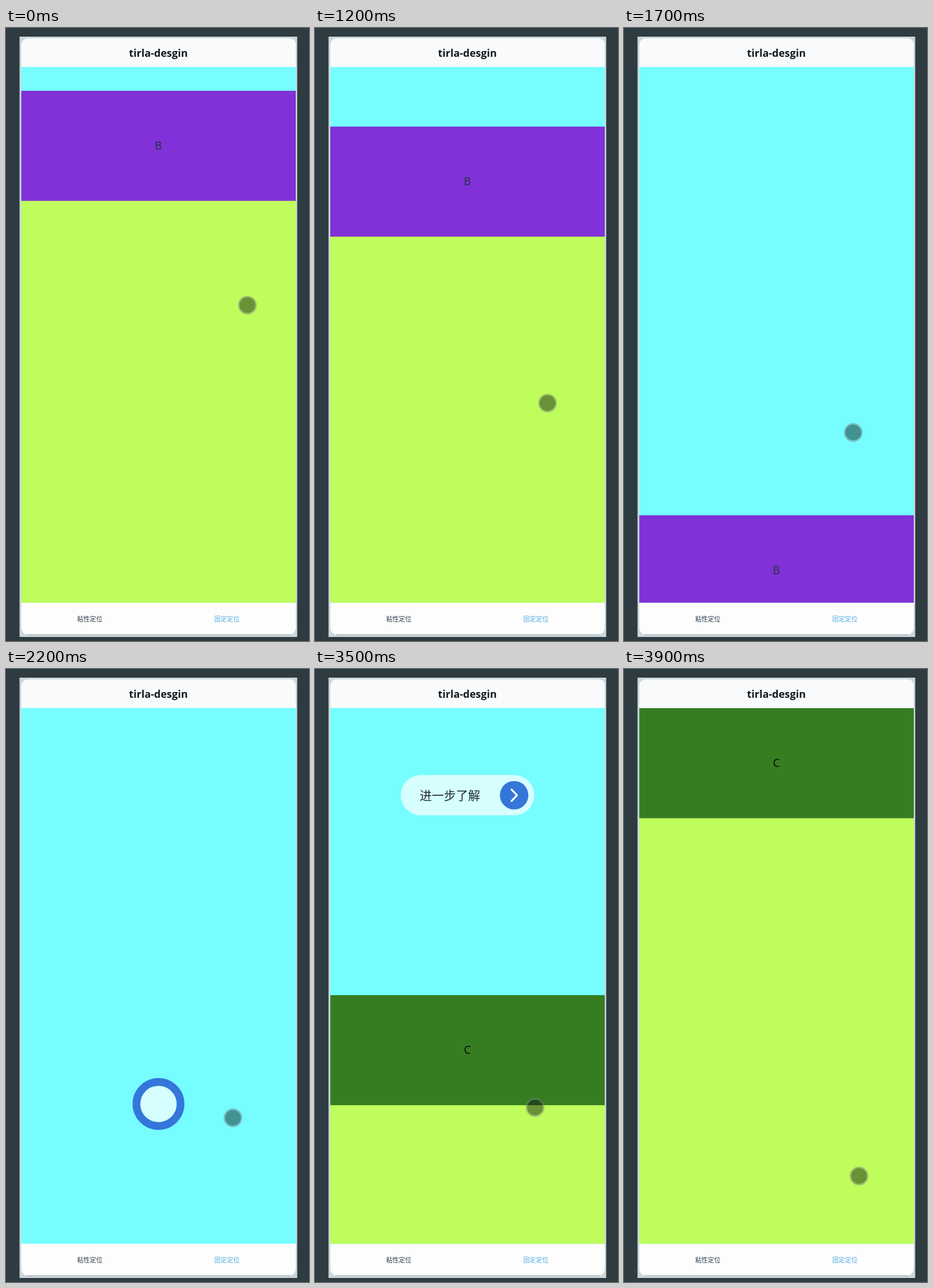
An HTML page for the animation above (4000 ms loop, 526 px wide and 1064 px high).

```html
<!DOCTYPE html>
<html lang="zh">
<head>
<meta charset="utf-8">
<style>
  html, body { margin: 0; width: 526px; height: 1064px; overflow: hidden; background: #2e3c41; }
  svg { display: block; }
  text { text-anchor: middle; font-family: "Open Sans", "Noto Sans CJK SC", "Noto Sans CJK", sans-serif; }
  .title { font-size: 18px; font-weight: 700; fill: #14191d; }
  .tab { font-size: 11px; }
  .letter { font: 19px "Noto Sans", sans-serif; }
  .glass { fill: #fff; fill-opacity: .7; }
</style>
</head>
<body>
<svg width="526" height="1064" viewBox="0 0 526 1064">
  <defs>
    <clipPath id="view"><rect x="26.5" y="67.7" width="476.5" height="929.8"/></clipPath>
  </defs>
  <rect width="526" height="1064" fill="#2e3c41"/>
  <path d="M0 .5H526M.5 0V1064" stroke="#1f3a52"/>
  <rect x="23.5" y="15" width="482" height="1042" fill="#cbd7da"/>
  <rect x="26.5" y="18" width="476.5" height="1035" rx="12" fill="#fdfdfd"/>
  <path d="M27 68V30Q27 18 39 18H491Q503 18 503 30V68Z" fill="#f9fafb"/>
  <path d="M36 1053H494" stroke="#93a0a4"/>
  <text class="title" x="264.5" y="50">tirla-desgin</text>

  <g clip-path="url(#view)">
    <rect x="26" y="67" width="478" height="932" fill="#75fdff"/>
    <g id="section">
      <rect y="190" x="26" width="478" height="940" fill="#befd5b"/>
      <rect id="block" x="26" width="478" height="191"/>
      <text id="letter" class="letter" x="264.5" y="102"></text>
    </g>

    <g id="player">
      <circle class="glass" cx="212.5" cy="685.5" r="35"/>
      <path d="M200.5 670V701M224 670V701" stroke="#858b80" stroke-width="4.5"/>
      <g id="progress">
        <rect class="glass" x="265.5" y="650.5" width="86.5" height="69.5" rx="34.7"/>
        <circle cx="275.8" cy="685" r="5.5" fill="#83887d"/>
        <circle cx="342" cy="685" r="5.5" fill="#83887d"/>
        <rect x="284" y="679.5" width="50" height="11" rx="5.5" fill="#bcc3b9"/>
        <rect id="fill" x="284" y="679.5" height="11" rx="5.5" fill="#83887d"/>
      </g>
    </g>

    <g id="pill">
      <rect id="glass" class="glass"/>
      <circle id="ring" fill="none" stroke="#3476d9"/>
      <g id="next">
        <circle r="24.7" fill="#3476d9"/>
        <path d="M-4.5 -10L5 0L-4.5 10" fill="none" stroke="#fff" stroke-width="3.2" stroke-linecap="round" stroke-linejoin="round"/>
      </g>
      <text id="more" x="-30.5" y="7.5" font-size="21" fill="#1d2b2f">进一步了解</text>
    </g>
  </g>

  <text class="tab" x="145.5" y="1030" fill="#2c3e50">粘性定位</text>
  <text class="tab" x="383.5" y="1030" fill="#52ace0">固定定位</text>
  <g id="touch">
    <circle r="13.8" fill="#04140e" fill-opacity=".46"/>
    <circle r="15" fill="none" stroke="#80808a" stroke-opacity=".5" stroke-width="2.4"/>
  </g>
</svg>
<script>
const LOOP = 4000, STEP = 100;
const TOP = 68, REST = 1102; // pinned and off-screen places of a section
const $ = id => document.getElementById(id);
const set = (id, attrs) => {
  for (const k in attrs) $(id).setAttribute(k, attrs[k]);
};
const move = (x, y, s = 1) => `translate(${x} ${y}) scale(${s})`;
const mix = (a, b, p) => a + (b - a) * p;

// Smooth 0 to 1 between two times
function ramp(t, from, to) {
  const p = Math.min(1, Math.max(0, (t - from) / (to - from)));
  return p * p * (3 - 2 * p);
}

// Where the finger passes: time, x, y
const path = [
  [0, 419, 481], [600, 417, 560], [1500, 399, 683], [2200, 394, 779],
  [2900, 393, 881], [3500, 382, 761], [3900, 408, 880]
];

function finger(t) {
  const i = Math.max(1, path.findIndex(p => p[0] >= t));
  const [t0, x0, y0] = path[i - 1], [t1, x1, y1] = path[i];
  const p = ramp(t, t0, t1);
  return move(mix(x0, x1, p), mix(y0, y1, p));
}

function drawSection(t, late) {
  const y = late
    ? mix(REST, TOP, ramp(t, 3080, 3900))
    : TOP + 41 * (1 - ramp(t, 0, 200)) + 992 * ramp(t, 1000, 2000);
  set('section', { transform: move(0, y) });
  set('block', { fill: late ? '#367d22' : '#8031d7' });
  set('letter', { fill: late ? '#061006' : '#2c3440' });
  $('letter').textContent = late ? 'C' : 'B';
  return y;
}

function drawPlayer(t) {
  const open = ramp(t, 300, 500);
  set('player', { opacity: ramp(t, 200, 400) - ramp(t, 1000, 1200) });
  set('progress', { opacity: open, transform: move(-53 * (1 - open), 0) });
  set('fill', { width: 50 * ramp(t, 200, 930) });
}

// A ring overshoots, settles into a disc, then widens into the pill
function drawPill(t, scroll) {
  const inner = 35 * ramp(t, 1950, 2260);
  const outer = 51 * ramp(t, 1900, 2100) - 16 * ramp(t, 2100, 2340);
  const half = inner + 81 * ramp(t, 2400, 2800);
  const button = ramp(t, 2500, 2800);
  set('pill', { transform: move(264.7, 755 - scroll) });
  set('glass', { x: -half, y: -inner, width: 2 * half, height: 2 * inner, rx: inner });
  set('ring', { r: (outer + inner) / 2, 'stroke-width': Math.max(0, outer - inner) });
  set('next', { transform: move(half - 35, 0, button), opacity: button });
  set('more', { opacity: ramp(t, 2900, 3100) });
}

function draw(t) {
  const late = t >= 2500;
  const y = drawSection(t, late);
  drawPlayer(t);
  drawPill(t, late ? REST - y : 0);
  set('touch', { transform: finger(t) });
}

function tick() {
  draw(Math.floor(performance.now() % LOOP / STEP) * STEP);
  requestAnimationFrame(tick);
}
tick();
</script>
</body>
</html>
```
